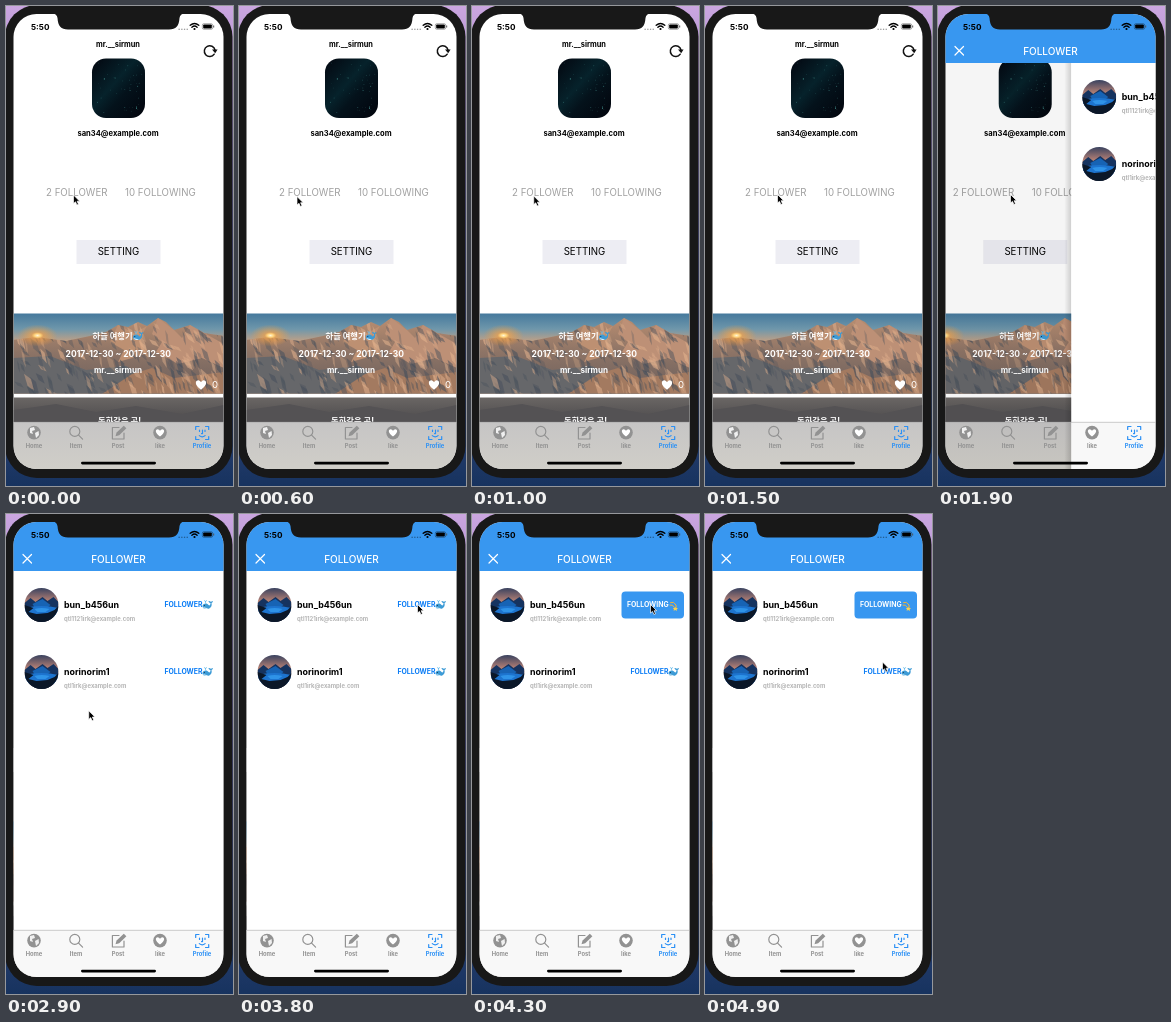
These frames come from a looping animation (227x480 px, 5000 ms). An HTML page:

```html
<!DOCTYPE html>
<html lang="ko">
<head>
<meta charset="utf-8">
<style>
  html, body { margin: 0; width: 100%; height: 100%; overflow: hidden; background: #181818; }
  svg { display: block; width: 227px; height: 480px; }
  text { font-family: Inter, "Noto Sans CJK KR", "Noto Sans CJK", sans-serif; }
  .b { font-weight: 700; }
  .mid { text-anchor: middle; }
  .line { fill: none; stroke-linecap: round; stroke-linejoin: round; }
</style>
</head>
<body>
<svg viewBox="0 0 227 480">
  <defs>
    <linearGradient id="wall" x2="0" y2="1">
      <stop offset="0" stop-color="#cba6e0"/><stop offset=".5" stop-color="#5a5fa0"/><stop offset="1" stop-color="#17335f"/>
    </linearGradient>
    <linearGradient id="sky" x2="0" y2="1">
      <stop offset="0" stop-color="#44789c"/><stop offset=".2" stop-color="#6f97ab"/><stop offset=".36" stop-color="#c5a183"/>
    </linearGradient>
    <linearGradient id="rock" x2="0" y2="1">
      <stop offset="0" stop-color="#b98d70"/><stop offset=".45" stop-color="#8d7466"/><stop offset="1" stop-color="#6b5f5c"/>
    </linearGradient>
    <linearGradient id="dusk" x2="0" y2="1">
      <stop offset="0" stop-color="#6a6664"/><stop offset="1" stop-color="#4c4a4c"/>
    </linearGradient>
    <linearGradient id="bar" x2="0" y2="1">
      <stop offset="0" stop-color="#c6c5c5"/><stop offset="1" stop-color="#d0cec8"/>
    </linearGradient>
    <linearGradient id="eve" x2="0" y2="1">
      <stop offset="0" stop-color="#39425f"/><stop offset=".35" stop-color="#a97a72"/><stop offset=".5" stop-color="#d99a70"/>
    </linearGradient>
    <linearGradient id="edge">
      <stop offset="0" stop-color="#000" stop-opacity="0"/><stop offset="1" stop-color="#000" stop-opacity=".16"/>
    </linearGradient>
    <radialGradient id="sun">
      <stop offset="0" stop-color="#fff6d6"/><stop offset=".16" stop-color="#ffd27a"/><stop offset=".3" stop-color="#f2a24a" stop-opacity=".7"/><stop offset="1" stop-color="#f29a3c" stop-opacity="0"/>
    </radialGradient>
    <linearGradient id="night" x2="1" y2="1">
      <stop offset="0" stop-color="#03060f"/><stop offset=".42" stop-color="#06222b"/><stop offset=".6" stop-color="#04121b"/><stop offset="1" stop-color="#02040c"/>
    </linearGradient>
    <clipPath id="screen"><rect x="7.5" y="8" width="210" height="455" rx="23"/></clipPath>
    <clipPath id="body"><rect x="7.5" y="8" width="210" height="408"/></clipPath>
    <clipPath id="card"><rect x="7.5" y="307.5" width="210" height="80"/></clipPath>
    <clipPath id="land"><use href="#ridge"/></clipPath>
    <clipPath id="round"><circle r="17"/></clipPath>
    <path id="ridge" d="M7 334L30 331L60 335L84 330L100 326L112 319L122 321L132 316L141 320L152 312L160 316L168 324L184 319L198 327L218 330V388H7Z"/>
    <g id="whale">
      <path d="M0 1C0-2 5-2.5 6 0C7 1 8 0 8-2C7-2 6-3 6-4Q8-4 8.5-3Q9-4 10.5-4Q10-2 9-2C10 2 7 4 4 4Q0 4 0 1Z" fill="#3d9bd6"/>
      <path d="M.4 2Q3 3 6 3.4Q2 5 .4 2Z" fill="#d6edf8"/>
      <path d="M3-2V-3.6M3-3.6L1.8-4.4M3-3.6L4.2-4.4" class="line" stroke="#5fb8ea" stroke-width=".7"/>
      <circle cx="1.8" cy=".6" r=".5" fill="#123"/>
    </g>
    <g id="lake" clip-path="url(#round)">
      <rect x="-17" y="-17" width="34" height="34" fill="url(#eve)"/>
      <path d="M-17-2L-11-7L-6-3L1-8L6-4L12-8L17-3V17H-17Z" fill="#16335f"/>
      <path d="M-9-1L1-6L9 0L4 4H-6Z" fill="#1763b4"/>
      <path d="M-17 3Q0-1 17 3V12H-17Z" fill="#1d74cf"/>
      <path d="M-17 0L-8 3L-13 7L-5 9L6 8L13 5L17 1V17H-17Z" fill="#0b1728"/>
      <path d="M-7 4Q0 2 8 4L4 7H-4Z" fill="#2f93e8"/>
    </g>
  </defs>

  <rect width="227" height="480" fill="url(#wall)"/>
  <rect x="-1" y="-1" width="227.5" height="473" rx="32" fill="#181818"/>

  <g clip-path="url(#screen)">
    <rect x="7" y="8" width="211" height="455" fill="#fff"/>

    <g id="profile">
      <g clip-path="url(#body)">
        <text class="b mid" x="112" y="40.6" font-size="7.4">mr.__sirmun</text>
        <path class="line" d="M208.200 48.2A5.4 5.4 0 1 1 209 44" stroke="#111" stroke-width="1.5"/>
        <path d="M206 43.600H211.600L209.200 47.2Z" fill="#111"/>
        <rect x="86" y="52.5" width="53" height="59.5" rx="14" fill="url(#night)"/>
        <g id="stars"></g>
        <text class="b mid" x="112" y="129.6" font-size="7.6">san34@example.com</text>
        <g font-size="9.7">
          <text x="40" y="190" fill="#a0a0a0">2 FOLLOWER</text>
          <text x="119" y="190" fill="#a0a0a0">10 FOLLOWING</text>
          <rect x="70.5" y="234" width="84" height="24" fill="#ededf3"/>
          <text class="mid" x="112.5" y="249.2">SETTING</text>
        </g>
        <g clip-path="url(#card)">
          <rect x="7" y="307" width="211" height="81" fill="url(#sky)"/>
          <use href="#ridge" fill="url(#rock)"/>
          <path d="M152 312L146 328L156 336L150 346L172 358L196 352L218 362V338L198 327L184 319L176 332L168 324Z" fill="#bd9076"/>
          <path d="M112 319L104 336L118 344L112 356L140 348L134 332L141 320L128 327Z" fill="#bd9072"/>
          <path d="M7 352L44 350L80 364L120 360L150 376L168 388H7Z" fill="#66676a"/>
          <path d="M96 388L126 368L146 362L168 372L218 366V388Z" fill="#a37a60"/>
          <g id="facets" clip-path="url(#land)"></g>
          <ellipse cx="31.500" cy="329.500" rx="20" ry="11" fill="url(#sun)"/>
        </g>
        <g fill="#fff">
          <text class="b" x="86.5" y="333.3" font-size="8.3">하늘 여행기</text>
          <text class="b mid" x="112.3" y="350.8" font-size="8.5">2017-12-30 ~ 2017-12-30</text>
          <text class="b mid" x="112" y="367" font-size="8.1">mr.__sirmun</text>
          <path d="M195 383.8C187 378 190 373.6 193 374.4Q194.6 374.9 195 376.3Q195.4 374.9 197 374.4C200 373.6 203 378 195 383.8Z"/>
          <text class="mid" x="209" y="382.4" font-size="9.6">0</text>
        </g>
        <use href="#whale" x="127" y="330"/>
        <rect x="7.5" y="391.5" width="210" height="25" fill="url(#dusk)"/>
        <path d="M7.5 404L50 398L90 406L130 400L176 408L217.5 399V417H7.5Z" fill="#545254"/>
        <text class="b" x="92" y="417.5" font-size="8.3" fill="#fff">동화같은 곳!</text>
      </g>
      <rect x="7.5" y="416" width="210" height="47" fill="url(#bar)"/>
    </g>
    <rect id="dim" x="7" y="8" width="211" height="455"/>

    <g id="list">
      <rect x=".5" y="57" width="7" height="406" fill="url(#edge)"/>
      <rect x="7.5" y="57" width="210" height="359" fill="#fff"/>
      <rect x="7.5" y="416" width="210" height="47" fill="#f8f8f8"/>
      <g id="rows"></g>
      <g id="following">
        <rect x="149.5" y="77.5" width="62.5" height="27" rx="4" fill="#3897f0"/>
        <text class="b" x="155" y="93.4" font-size="6.9" fill="#fff">FOLLOWING</text>
        <path class="line" d="M198.5 88.5Q202 87 204 91Q205 94 203 95M198 91Q201 90.4 202 93" stroke="#f0b43c" stroke-width="1"/>
        <path d="M203 92.5L204 94L206 94.2L204.6 95.4L205 97L203.3 96L201.6 96.8L202 95.2L200.8 94L202.4 94Z" fill="#ffd14a"/>
      </g>
    </g>

    <g id="nav">
      <rect x="7" y="8" width="211" height="49" fill="#3897f0"/>
      <path class="line" d="M17 40.5L25.5 49M25.5 40.5L17 49" stroke="#fff" stroke-width="1.2"/>
      <text class="mid" x="112.5" y="48.5" font-size="10" font-weight="500" fill="#fff">FOLLOWER</text>
    </g>

    <text class="b" x="25" y="23.6" font-size="8.2">5:50</text>
    <path d="M172.5 23.3H182" stroke="#000" stroke-opacity=".5" stroke-width="1.1" stroke-dasharray="1.3 1.4"/>
    <path class="line" d="M184.2 19.3Q188.5 15.6 192.8 19.3M185.9 21.2Q188.5 19 191.1 21.2" stroke="#000" stroke-width="1.4"/>
    <circle cx="188.5" cy="23" r="1.1"/>
    <rect x="196.3" y="17.6" width="10.4" height="5.8" rx="1.6" fill="none" stroke="#000" stroke-opacity=".5" stroke-width=".6"/>
    <rect x="197.2" y="18.5" width="8.6" height="4" rx=".8"/>
    <path d="M207.7 19.5V21.5" stroke="#555"/>

    <path d="M7 416.3H218" stroke="#a9a9a9" stroke-width=".6"/>
    <g fill="#929292" stroke="#929292" stroke-width="0">
      <circle cx="28" cy="426.6" r="6.8"/>
      <path d="M24 422L28 421L29 424L26 425L27 428L24 427ZM29 427L32.6 425L33 429L30 432Z" fill="#f0f0f0"/>
      <g class="line" fill="none" stroke-width="1.2">
        <circle cx="68.8" cy="425.4" r="5"/>
        <path d="M72.6 429.2L76.6 433.2"/>
        <path d="M113 421.5H106.4V433H118V427"/>
      </g>
      <path d="M109.5 430.3L110.6 426.5L117.8 419.7L120.4 422.2L113.2 429.2Z"/>
      <circle cx="154" cy="426.6" r="6.8"/>
      <path d="M154 430.6C147.5 426 150 422.8 152.3 423.4Q153.7 423.8 154 424.9Q154.3 423.8 155.7 423.4C158 422.8 160.5 426 154 430.6Z" fill="#fff"/>
    </g>
    <path class="line" d="M189.7 423.5V420.5H193M199.5 420.5H202.7V423.5M202.7 430.5V433.5H199.5M193 433.5H189.7V430.5M193.5 424V425.5M199 424V425.5M196.5 424V427.6H195.5M193.3 429.6Q196.2 432 199.1 429.6" stroke="#2b90f5" stroke-width="1.2"/>
    <g id="tabs" class="b mid" font-size="5.8"></g>
    <rect x="75" y="455.7" width="75" height="2.8" rx="1.4"/>
  </g>

  <path d="M46 7Q51 8 51.5 12C52 20 55 23.5 62 23.5H163C170 23.5 173 20 173.5 12Q174 8 179 7Z" fill="#181818"/>
  <path id="cursor" d="M0 0V8.6L2 6.8L3.4 10L5 9.3L3.6 6.2H6.2Z" stroke="#fff" stroke-width=".7"/>
</svg>

<script>
const $ = id => document.getElementById(id);

let seed = 7;
const rand = () => (seed = seed * 16807 % 2147483647) / 2147483647;
const scatter = (id, n, shape) => $(id).innerHTML = Array.from({ length: n }, shape).join("");

scatter("stars", 45, () =>
  `<circle cx="${89 + rand() * 47}" cy="${57 + rand() * 51}" r="${.2 + rand() * .35}" fill="#4fa59f" opacity="${.3 + rand() * .6}"/>`);

// slanted rock faces: sunlit ones mostly on the right, bluish shadows between them
scatter("facets", 220, () => {
  const x = 8 + rand() * 210, y = 312 + rand() * 76, w = 2 + rand() * 5, h = 4 + rand() * 9;
  const lit = rand() < .25 + x / 600;
  return `<path d="M${x} ${y}l${w} ${h * .4}l${w * .5} ${h}l${-w} ${-h * .5}Z" fill="${lit ? "#e0b08c" : "#47505c"}" opacity="${.25 + rand() * .4}"/>`;
});

const row = (y, name, mail, id) => `
  <use href="#lake" x="35.5" y="${y}"/>
  <text class="b" x="58" y="${y + 3}" font-size="8.9">${name}</text>
  <text class="b" x="58" y="${y + 16.3}" font-size="5.9" fill="#b5b5b5">${mail}</text>
  <g id="${id}"><text class="b" x="158.5" y="${y + 2.4}" font-size="6.9" fill="#0a7cf5">FOLLOWER</text>
  <use href="#whale" x="196.5" y="${y}"/></g>`;
$("rows").innerHTML = row(91, "bun_b456un", "qtl1121irk@example.com", "follow1")
  + row(158, "norinorim1", "qtl1irk@example.com", "follow2");

$("tabs").innerHTML = ["Home", "Item", "Post", "like", "Profile"].map((label, i) =>
  `<text x="${28 + 42 * i}" y="441.8" fill="${i == 4 ? "#2b90f5" : "#929292"}">${label}</text>`).join("");

const LOOP = 5000, STEP = 100, PUSH = 1831, FOLLOW = 4100;
// time, x, y of the pointer tip
const path = [
  [0, 67.5, 189], [500, 58, 190.5], [800, 58, 190.5], [1400, 72.5, 188.5], [1900, 72.5, 188.5],
  [2200, 65, 216.5], [2700, 65, 216.5], [3500, 178.5, 90.5], [4300, 178.5, 90.5], [4800, 177.5, 148], [5000, 177.5, 148]
];

function pointer(t) {
  const i = path.findIndex(p => p[0] > t);
  const [t0, x0, y0] = path[i - 1], [t1, x1, y1] = path[i];
  const u = (t - t0) / (t1 - t0), e = u * u * (3 - 2 * u);
  return [x0 + (x1 - x0) * e, y0 + (y1 - y0) * e];
}

const show = (id, on) => $(id).setAttribute("visibility", on ? "visible" : "hidden");
const move = (id, x, y = 0) => $(id).setAttribute("transform", `translate(${x} ${y})`);

function draw(t) {
  const s = Math.max(0, t - PUSH) / 50;
  const p = 1 - (1 + s) * Math.exp(-s); // critically damped spring
  move("profile", -63 * p);
  move("list", 210 * (1 - p));
  $("dim").setAttribute("opacity", .1 * p);
  show("list", t > PUSH);
  show("nav", t > PUSH);
  const followed = t >= FOLLOW;
  $("follow1").setAttribute("opacity", followed ? 0 : 1);
  $("following").setAttribute("opacity", followed ? 1 : 0);
  move("cursor", ...pointer(t));
}

const start = performance.now();
function tick() {
  const t = (performance.now() - start) % LOOP;
  draw(Math.floor(t / STEP) * STEP);
  requestAnimationFrame(tick);
}
tick();
</script>
</body>
</html>
```
